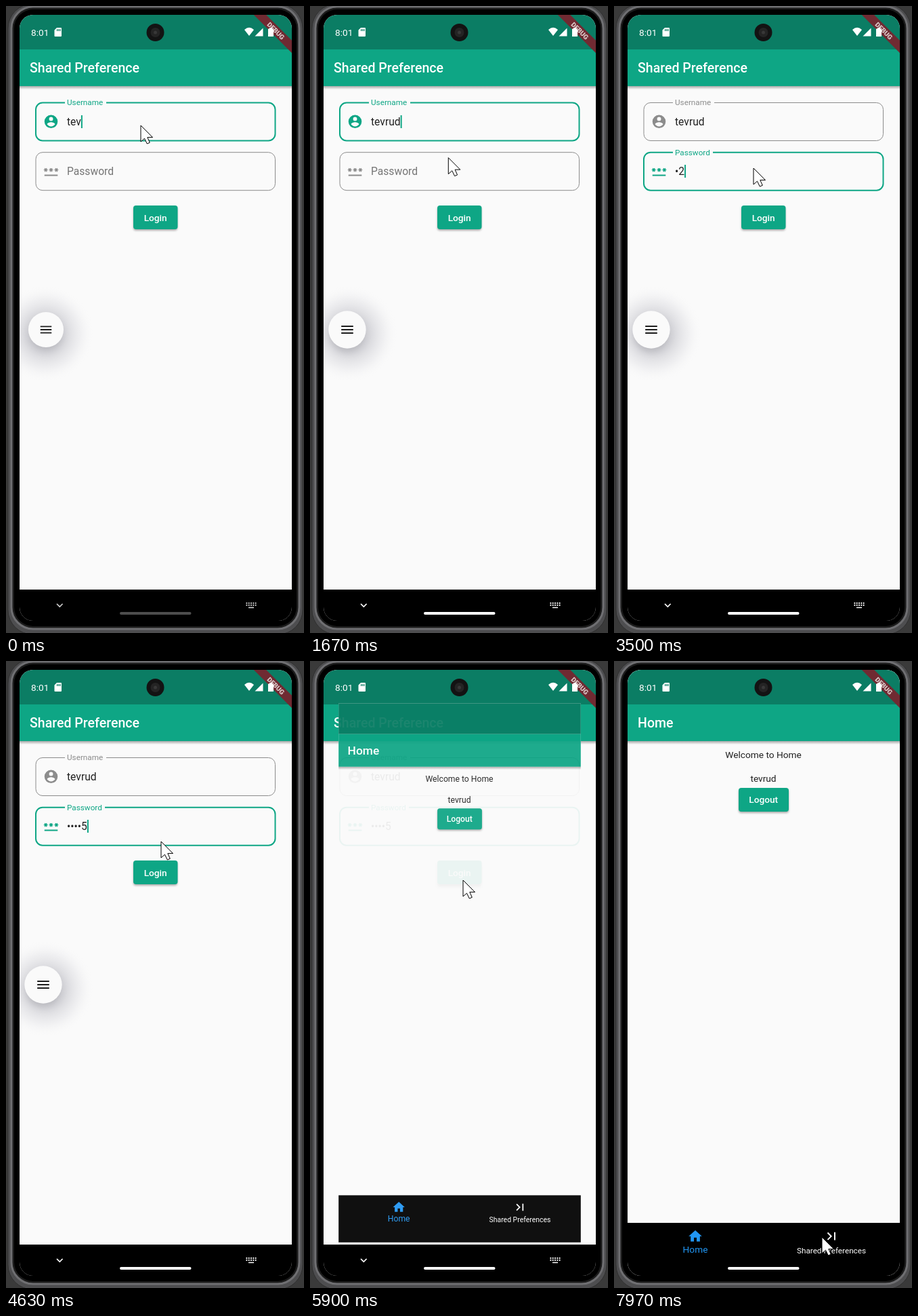
These frames come from a looping animation (440 by 924 pixels, 8000 ms). An HTML page:

```html
<!DOCTYPE html>
<html lang="en">
<head>
<meta charset="utf-8">
<title>Login demo</title>
<style>
  html, body { margin: 0; width: 100%; height: 100%; overflow: hidden; background: #3a3a3a; }
  svg { display: block; width: 440px; height: 924px; }
  text { font-family: Roboto, sans-serif; font-size: 13.7px; fill: #212121; white-space: pre; }
  .title { font-size: 19.56px; font-weight: 500; fill: #fff; }
  .input { font-size: 15.65px; }
  .label { font-size: 11.74px; }
  .btn { font-weight: 500; fill: #fff; }
  .mid { text-anchor: middle; }
  .white { fill: #fff; }
  .teal { fill: #0ea685; }
  .blue { fill: #2196f3; }
  .hint { fill: #757575; }
</style>
</head>
<body>
<svg viewBox="0 0 440 924">
  <defs>
    <clipPath id="screen"><rect x="20" y="13" width="402" height="893" rx="20"/></clipPath>
    <radialGradient id="glow">
      <stop offset="0" stop-color="#a8a8b0" stop-opacity=".8"/>
      <stop offset=".4" stop-color="#b8b8c0" stop-opacity=".55"/>
      <stop offset=".7" stop-color="#d4d4da" stop-opacity=".3"/>
      <stop offset="1" stop-color="#fafafa" stop-opacity="0"/>
    </radialGradient>
    <linearGradient id="barShade" x2="0" y2="1">
      <stop stop-color="#707070" stop-opacity=".6"/>
      <stop offset="1" stop-color="#707070" stop-opacity="0"/>
    </linearGradient>
    <filter id="blur" x="-50%" y="-50%" width="200%" height="200%"><feGaussianBlur stdDeviation="1.6"/></filter>
    <filter id="soft" x="-50%" y="-50%" width="200%" height="200%"><feGaussianBlur stdDeviation="5"/></filter>
    <path id="star" d="M3.15 12.95L4 11.47l.85 1.48 1.3-.75-.85-1.48H7v-1.5H5.3l.85-1.47L4.85 7 4 8.47 3.15 7l-1.3.75.85 1.47H1v1.5h1.7l-.85 1.48z"/>
    <g id="bar">
      <rect x="20" y="13" width="402" height="893" fill="#fafafa"/>
      <rect x="20" y="118" width="402" height="5" fill="url(#barShade)"/>
      <rect x="20" y="13" width="402" height="51" fill="#0b7d64"/>
      <rect class="teal" x="20" y="64" width="402" height="54"/>
    </g>
  </defs>

  <!-- phone body -->
  <rect width="440" height="924" fill="#3a3a3a"/>
  <rect x="3" y="-3" width="435" height="929" rx="36" fill="#4e4e50" stroke="#303030"/>
  <rect x="8" y="1" width="425" height="917" rx="32" fill="#1c1c1c" stroke="#6f6f72" stroke-width="3"/>
  <rect x="12" y="5" width="417" height="909" rx="28"/>

  <g clip-path="url(#screen)">
    <g id="login">
      <use href="#bar"/>
      <text class="title" x="35" y="98">Shared Preference</text>

      <path id="userBox" fill="none"/>
      <text id="userLabel" class="label" x="90" y="146">Username</text>
      <path id="userIcon" fill-rule="evenodd" transform="translate(54.8 158.6) scale(.978)"
        d="M12 2a10 10 0 1 0 0 20 10 10 0 0 0 0-20zm0 3a3 3 0 1 1 0 6 3 3 0 0 1 0-6zm0 14.2c-2.5 0-4.71-1.28-6-3.22.03-1.99 4-3.08 6-3.08 1.99 0 5.97 1.09 6 3.08-1.29 1.94-3.5 3.22-6 3.22z"/>
      <text id="user" class="input" x="90" y="176"></text>

      <path id="passBox" fill="none"/>
      <text id="passLabel" x="90">Password</text>
      <g id="passIcon" transform="translate(54.8 231.8) scale(.978)">
        <use href="#star"/><use href="#star" x="8"/><use href="#star" x="16"/>
        <path d="M2 17h20v2H2z"/>
      </g>
      <text id="hint" class="input hint" x="90" y="249">Write your password here...</text>
      <text id="pass" class="input" x="90" y="249"></text>
      <rect id="caret" class="teal" width="2" height="19"/>

      <rect id="pressShade" x="188" y="297" width="65" height="35" rx="4" fill="#777" filter="url(#blur)"/>
      <rect class="teal" x="188" y="294" width="65.5" height="35" rx="4"/>
      <text class="btn mid" x="220.7" y="317">Login</text>

      <g id="toolbar">
        <circle cx="58" cy="483" r="72" fill="url(#glow)"/>
        <g id="disc">
          <circle cy="7" r="25" fill="#a4a4aa" opacity=".5" filter="url(#soft)"/>
          <circle r="27.7" fill="#fafafa"/>
          <path d="M-8.8 -5h17.6M-8.8 0h17.6M-8.8 5h17.6" stroke="#1d1d1d" stroke-width="1.9"/>
        </g>
      </g>

      <rect x="20" y="860" width="402" height="46"/>
      <g id="navKeys" fill="none" stroke="#fff">
        <path d="M75 881l4.3 4.3 4.3-4.3" stroke-width="1.7"/>
        <path d="M354.5 880h15M354.5 883h15" stroke-width="1.8" stroke-dasharray="1.8 1.5"/>
        <path d="M358 886.5h8" stroke-width="1.7"/>
      </g>
    </g>

    <g id="home">
      <use href="#bar"/>
      <text class="title" x="35" y="98">Home</text>
      <text class="mid" x="220.5" y="143">Welcome to Home</text>
      <text id="homeUser" class="mid" x="220.5" y="178"></text>
      <rect x="184" y="189" width="74" height="35" rx="4" fill="#777" opacity=".6" filter="url(#blur)"/>
      <rect class="teal" x="184" y="187" width="74" height="35" rx="4"/>
      <text class="btn mid" x="220.7" y="209">Logout</text>
      <rect x="20" y="828" width="402" height="78"/>
      <path class="blue" transform="translate(108.3 836) scale(.978)" d="M10 20v-6h4v6h5v-8h3L12 3 2 12h3v8z"/>
      <text class="mid blue" x="120" y="872">Home</text>
      <path class="white" transform="translate(309.3 836) scale(.978)" d="M5.59 7.41L10.18 12l-4.59 4.59L7 18l6-6-6-6zM16 6h2v12h-2z"/>
      <text class="label mid white" x="321" y="872.5">Shared Preferences</text>
    </g>

    <!-- system overlays -->
    <rect id="pill" class="white" x="168" y="893" width="105.5" height="4" rx="2"/>
    <g transform="translate(398.5 36.5) rotate(45)">
      <rect x="-50" y="-6.5" width="100" height="13" fill="#702a32"/>
      <text class="mid" y="3.6" style="font-size:9.9px;font-weight:900;fill:#dccaca">DEBUG</text>
    </g>
    <text class="white" x="37" y="44">8:01</text>
    <g class="white">
      <path fill-rule="evenodd" d="M75 32h6q1 0 1 1v11q0 1-1 1h-8.500q-1 0-1-1v-8.500zM75 34v3h1.200v-3zm2.200 0v3h1.200v-3zm2.200 0v3h1.200v-3z"/>
      <path d="M352 35q7-6.500 14 0l-7 9z"/>
      <path d="M367.500 44.500h12v-12z"/>
      <path d="M387 33.500h2v-1.500h4v1.500h2v11.500h-8z"/>
    </g>
    <circle cx="220.5" cy="39" r="13" fill="#131313"/>
    <circle cx="220.5" cy="39" r="7" fill="#242424"/>
    <circle cx="220.5" cy="39" r="2.5" fill="#383838"/>
  </g>

  <path id="mouse" d="M0 0V24L5.500 19.200L9.300 27L13.300 25.300L9.800 17.600H17.500Z" fill="#fff" stroke="#000"/>
</svg>

<script>
  const LOOP = 8000, TEAL = [14, 166, 133], GREY = [140, 140, 140];
  const NAME = 'tevrud', CODE = '12345';
  const NAME_KEYS = [200, 400, 600];
  const CODE_KEYS = [3000, 3350, 3700, 4050, 4400];
  const FOCUS = 1950, TAP = 5500, OPEN_HOME = 5800;
  const MOUSE = [
    [0, 199, 176], [1400, 199, 176], [1800, 206, 239], [4300, 206, 239],
    [4630, 229, 266], [5150, 226, 323], [5900, 226, 323],
    [6300, 452, 430], [7000, 452, 800], [7500, 307, 849], [LOOP, 307, 849]
  ];

  const el = {};
  document.querySelectorAll('[id]').forEach(node => el[node.id] = node);
  const set = (node, attrs) => {
    for (const key in attrs) node.setAttribute(key, attrs[key]);
  };
  const mix = (a, b, k) => a + (b - a) * k;
  const tint = k => `rgb(${GREY.map((c, i) => Math.round(mix(c, TEAL[i], k)))})`;
  const ramp = (t, start, length) => {
    const k = Math.min(1, Math.max(0, (t - start) / length));
    return k * k * (3 - 2 * k);
  };
  const pressed = (keys, t) => keys.filter(k => k <= t).length;

  // Outlined field with an opening of the given width for its label
  function outline(node, top, gap, focus) {
    const l = 44, r = 397.5, b = top + 56, c = 10;
    set(node, {
      d: `M${87 + gap} ${top}H${r - c}a${c} ${c} 0 0 1 ${c} ${c}V${b - c}a${c} ${c} 0 0 1 -${c} ${c}` +
         `H${l + c}a${c} ${c} 0 0 1 -${c} -${c}V${top + c}a${c} ${c} 0 0 1 ${c} -${c}H87`,
      stroke: tint(focus), 'stroke-width': 1 + focus
    });
  }

  function mouseAt(t) {
    const i = Math.max(1, MOUSE.findIndex(p => p[0] > t));
    const [t0, x0, y0] = MOUSE[i - 1], [t1, x1, y1] = MOUSE[i];
    const k = ramp(t, t0, t1 - t0);
    return [mix(x0, x1, k), mix(y0, y1, k)];
  }

  function drawForm(t) {
    const focus = ramp(t, FOCUS, 167), onPass = t >= FOCUS;
    const typed = pressed(CODE_KEYS, t);
    el.user.textContent = NAME.slice(0, 3 + pressed(NAME_KEYS, t));
    el.pass.textContent = typed ? '•'.repeat(typed - 1) + CODE[typed - 1] : '';

    outline(el.userBox, 142.5, 61, 1 - focus);
    outline(el.passBox, 215.7, 59 * focus, focus);
    el.userLabel.style.fill = el.userIcon.style.fill = tint(1 - focus);
    el.passIcon.style.fill = tint(focus);
    el.passLabel.style.fill = focus ? tint(focus) : '#757575';
    el.passLabel.style.fontSize = mix(15.65, 11.74, focus) + 'px';
    set(el.passLabel, { y: mix(248.5, 220, focus) });
    set(el.hint, { opacity: typed ? 0 : focus });

    const line = onPass ? el.pass : el.user;
    const width = line.textContent ? line.getComputedTextLength() : 0;
    const lastKey = Math.max(0, ...[FOCUS, ...NAME_KEYS, ...CODE_KEYS].filter(k => k <= t));
    set(el.caret, {
      x: 90 + width, y: onPass ? 234 : 161,
      opacity: Math.floor((t - lastKey) / 500) % 2 ? 0 : 1
    });

    const press = ramp(t, TAP, 150);
    set(el.pressShade, { y: mix(296, 298, press), opacity: mix(.6, .85, press) });
  }

  function draw(t) {
    drawForm(t);

    const settle = ramp(t, 0, 300);
    set(el.disc, { transform: `translate(${mix(59, 55, settle)} 477) scale(${mix(.94, 1, settle)})` });
    set(el.toolbar, { opacity: 1 - ramp(t, TAP, 100) });
    set(el.pill, { opacity: mix(.3, 1, settle) });
    set(el.navKeys, { opacity: mix(.8, 1, settle) });

    const scale = mix(.85, 1, ramp(t, OPEN_HOME, 300));
    set(el.home, {
      opacity: ramp(t, OPEN_HOME, 120),
      transform: `translate(221 460) scale(${scale}) translate(-221 -460)`
    });
    set(el.mouse, { transform: `translate(${mouseAt(t)})` });
  }

  el.homeUser.textContent = NAME;
  const start = performance.now();
  function tick() {
    draw((performance.now() - start) % LOOP);
    requestAnimationFrame(tick);
  }
  tick();
</script>
</body>
</html>
```
